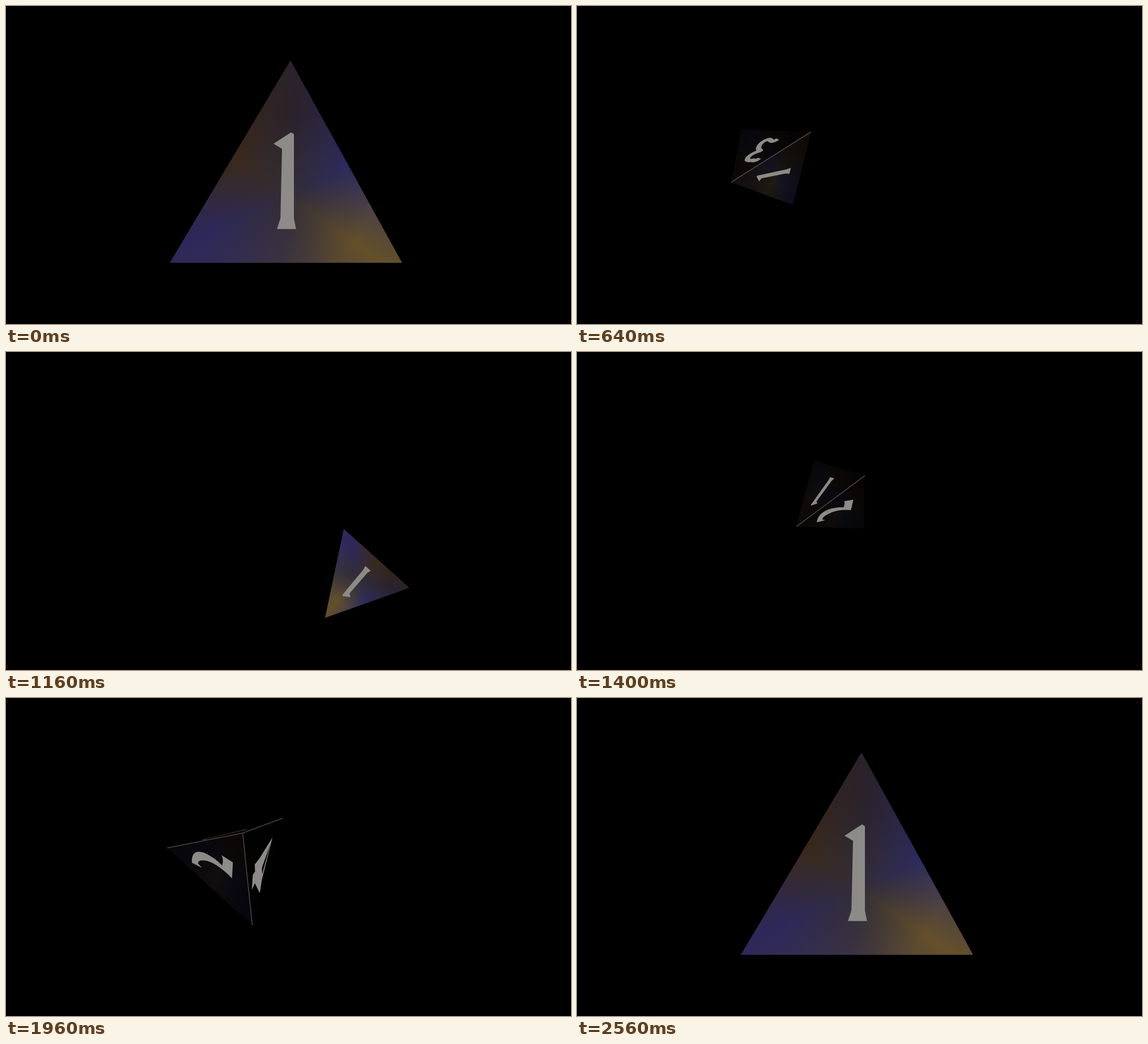
An HTML page with a canvas for the animation above (2.6 s loop, 997 px wide and 561 px high).

```html
<!DOCTYPE html>
<html lang="en">
<head>
<meta charset="utf-8">
<title>Rolling four-sided die</title>
<style>
  html, body { margin: 0; width: 100%; height: 100%; overflow: hidden; background: #000; }
  canvas { display: block; }
</style>
</head>
<body>
<canvas id="stage" width="997" height="561"></canvas>
<script>
const ctx = document.getElementById('stage').getContext('2d');
const LOOP = 2600, STEP = 40, REST = 2520;
const INK = '#8d8b87', RIDGE = '#4c463c';
const SHEEN = ['#64502a', '#3c3444', '#2d285a', '#3c2812', '#2a222c', '#2a2a68'];

// Corners A, B, C, D of a regular tetrahedron.
const CORNERS = [[1, 1, 1], [1, -1, -1], [-1, 1, -1], [-1, -1, 1]];

// Faces as [apex, right, left] seen from outside. Digits are drawn in face
// units: x along the base, y from the apex (0) to the base (1).
const FACES = [
  { ids: [0, 2, 1],
    digit: 'M-.065 .412L.009 .356 .022 .364 .03 .78 .04 .833H-.042L-.028 .78V.437L-.045 .425Z' },
  { ids: [0, 1, 3],
    digit: 'M-.074 .423L-.058 .3Q.1 .31 .108 .47Q.1 .6 .043 .69Q.12 .72 .158 .696L.125 .833 ' +
      '-.058 .8Q.06 .6 .02 .46Q0 .38 -.04 .38Z' },
  { ids: [0, 3, 2], pen: .065,
    digit: 'M-.125 .84Q-.095 .77 -.045 .81C.045 .88 .115 .68 -.025 .61C.105 .54 .085 .38 -.035 .43' +
      'Q-.085 .4 -.1 .47' },
  { ids: [2, 3, 1],
    digit: 'M.014 .295L0 .65 -.02 .79 .05 .8 .043 .861 .166 .924 .155 .833 .324 .74 .233 .655Z' +
      'M.125 .625L.042 .362 .188 .636Z' }
];
for (const face of FACES) face.shape = new Path2D(face.digit);

// Corners A to D on the stage; null is the corner hidden behind the others.
const HOME = [[502, 96], [289, 453], [699, 453], null];
const POSES = [
  { t: 0, pts: HOME },
  { t: 280, pts: [[371, 274], [331, 170], [502, 151], [333, 79]] },
  { t: 640, pts: [[272, 311], [381, 351], [413, 222], [290, 217]] },
  { t: 1160, pts: [[563, 469], [712, 416], [596, 312], null] },
  { t: 1640, pts: [[390, 171], [477, 54], null, [537, 181]], light: .4 },
  { t: 2280, pts: [[234, 266], [238, 456], [477, 359], [303, 514]] },
  { t: REST, pts: HOME }
];

// Points the die passes between poses: [time, x, y].
const PASSES = [[480, 326, 230], [860, 425, 245], [1200, 650, 396], [1480, 400, 205],
  [1780, 545, 145], [2160, 245, 425]];

const mix = (a, b, u) => a + (b - a) * u;
const dot = (a, b) => a.reduce((sum, v, i) => sum + v * b[i], 0);
const scale = (a, k) => a.map(v => v * k);
const unit = a => scale(a, 1 / Math.hypot(...a));
const mean = points => [0, 1].map(k => points.reduce((s, p) => s + p[k], 0) / points.length);
const turn = ([a, b, c]) => (b[0] - a[0]) * (c[1] - a[1]) - (b[1] - a[1]) * (c[0] - a[0]);
const cross = (a, b) => [0, 1, 2].map(i => {
  const j = (i + 1) % 3, k = (i + 2) % 3;
  return a[j] * b[k] - a[k] * b[j];
});

function toQuat(m) {
  const [a, b, c] = [m[0][0], m[1][1], m[2][2]];
  const part = (v, d) => Math.sqrt(Math.max(0, v)) / 2 * (d < 0 ? -1 : 1);
  return unit([part(1 + a + b + c, 1), part(1 + a - b - c, m[2][1] - m[1][2]),
    part(1 - a + b - c, m[0][2] - m[2][0]), part(1 - a - b + c, m[1][0] - m[0][1])]);
}

function slerp(p, q, u) {
  let d = dot(p, q);
  if (d < 0) { q = scale(q, -1); d = -d; }
  const angle = Math.acos(Math.min(d, .99999));
  const f = Math.sin((1 - u) * angle), g = Math.sin(u * angle);
  return unit(p.map((v, i) => f * v + g * q[i]));
}

// The first two rows of the rotation are enough for a flat projection.
function project([w, x, y, z], size) {
  const rows = [
    [1 - 2 * (y * y + z * z), 2 * (x * y - w * z), 2 * (x * z + w * y)],
    [2 * (x * y + w * z), 1 - 2 * (x * x + z * z), 2 * (y * z - w * x)]
  ];
  return CORNERS.map(v => rows.map(r => dot(r, v) * size));
}

// Turn the corners of a pose into centre, size, rotation and a small remainder.
function solve(pose) {
  const pts = pose.pts.map(p => p || mean(pose.pts.filter(Boolean)));
  const rows = [0, 1].map(k => [0, 1, 2].map(j =>
    pts.reduce((sum, p, i) => sum + p[k] * CORNERS[i][j], 0) / 4));
  const x = unit(rows[0]), z = unit(cross(x, rows[1]));
  const mid = mean(pts), size = (Math.hypot(...rows[0]) + Math.hypot(...rows[1])) / 2;
  const quat = toQuat([x, cross(z, x), z]);
  const rest = project(quat, size).map((p, i) => p.map((v, k) => pts[i][k] - mid[k] - v));
  return { light: 1, ...pose, mid, size, quat, rest };
}

const keys = POSES.map(solve);
const path = [...keys.map(k => [k.t, ...k.mid]), ...PASSES].sort((a, b) => a[0] - b[0]);

// Smooth curve through the path, with slopes taken from the neighbours.
function centre(t) {
  let i = 0;
  while (i < path.length - 2 && path[i + 1][0] <= t) i++;
  const a = path[i], b = path[i + 1], span = b[0] - a[0], u = (t - a[0]) / span;
  const before = path[i - 1] || a, after = path[i + 2] || b;
  return [1, 2].map(k => {
    const m = (b[k] - before[k]) / (b[0] - before[0]) * span;
    const n = (after[k] - a[k]) / (after[0] - a[0]) * span;
    return mix(a[k], b[k], u * u * (3 - 2 * u)) + u * (1 - u) * ((1 - u) * m - u * n);
  });
}

function poseAt(t) {
  let i = 0;
  while (i < keys.length - 2 && keys[i + 1].t <= t) i++;
  const a = keys[i], b = keys[i + 1], u = (t - a.t) / (b.t - a.t), mid = centre(t);
  const size = mix(a.size, b.size, u);
  const pts = project(slerp(a.quat, b.quat, u), size).map((p, n) =>
    p.map((v, k) => v + mid[k] + mix(a.rest[n][k], b.rest[n][k], u)));
  return { pts, size, light: mix(a.light, b.light, u) };
}

// A ring of dark colours around the face, calmed by a neutral middle.
function paintFace(corners, size, spin, light) {
  const mid = mean(corners);
  const ring = ctx.createConicGradient(spin, ...mid);
  [...SHEEN, SHEEN[0]].forEach((c, i) => ring.addColorStop(i / SHEEN.length, c));
  const core = ctx.createRadialGradient(...mid, 0, ...mid, size);
  core.addColorStop(0, '#322d36');
  core.addColorStop(1, '#322d3600');

  // Faces turned away from the viewer fall into shadow.
  const facing = Math.min(1, turn(corners) / (4 * Math.sqrt(3) * size * size));
  ctx.globalAlpha = light * facing ** 3;
  ctx.beginPath();
  corners.forEach(p => ctx.lineTo(...p));
  for (const fill of [ring, core]) {
    ctx.fillStyle = fill;
    ctx.fill();
  }
  ctx.globalAlpha = 1;
}

function paintDigit([apex, right, left], { shape, pen }) {
  const base = mean([right, left]);
  ctx.save();
  ctx.transform(right[0] - left[0], right[1] - left[1],
    base[0] - apex[0], base[1] - apex[1], ...apex);
  ctx.fillStyle = ctx.strokeStyle = INK;
  ctx.lineJoin = 'round';
  if (pen) {
    ctx.lineWidth = pen;
    ctx.stroke(shape);
  } else {
    ctx.fill(shape, 'evenodd');
  }
  ctx.restore();
}

function draw(t) {
  const { pts, size, light } = poseAt(t);
  const spin = (35 + 100 * Math.sqrt(Math.max(0, Math.sin(Math.PI * t / REST)))) * Math.PI / 180;
  const cornersOf = face => face.ids.map(i => pts[i]);
  const front = FACES.filter(face => turn(cornersOf(face)) > 0);

  ctx.fillStyle = '#000';
  ctx.fillRect(0, 0, 997, 561);
  for (const face of front) {
    paintFace(cornersOf(face), size, spin, light);
    paintDigit(cornersOf(face), face);
  }

  // Ridges where two visible faces meet.
  ctx.strokeStyle = RIDGE;
  ctx.lineWidth = 1.5;
  front.forEach((f, n) => front.slice(n + 1).forEach(g => {
    ctx.beginPath();
    f.ids.filter(i => g.ids.includes(i)).forEach(i => ctx.lineTo(...pts[i]));
    ctx.stroke();
  }));
}

function tick() {
  const t = Math.floor(performance.now() % LOOP / STEP) * STEP;
  draw(Math.min(t, REST));
  requestAnimationFrame(tick);
}
tick();
</script>
</body>
</html>
```
